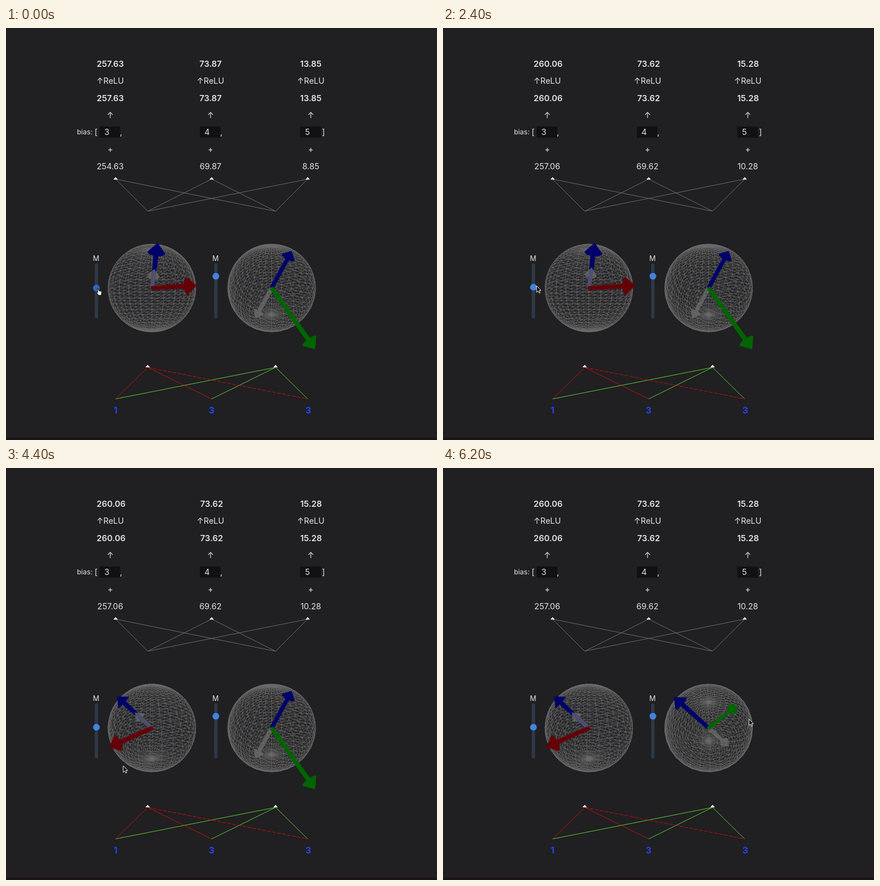
These frames come from a looping animation (765 px wide and 732 px high, 6300 ms). An HTML page with a canvas:

```html
<!DOCTYPE html>
<html lang="en">
<head>
<meta charset="utf-8">
<title>Layer weights</title>
<style>
  html, body { margin: 0; height: 100%; overflow: hidden; background: #201f21; }
  canvas { display: block; }
</style>
</head>
<body>
<canvas id="stage" width="765" height="732"></canvas>
<script>
const ctx = document.getElementById('stage').getContext('2d');
const LOOP = 6300, STEP = 100;
const RAD = Math.PI / 180;
const COLUMNS = [185, 363, 541];
const DISTANCE = 2.7, FOCAL = 195.6, SEGMENTS = 32;
const RED = '#640008', BLUE = '#00006a', GREEN = '#006400', GRAY = 'rgba(112,112,112,.7)';

// Timelines: [time, ...values]
const SCALE = [[0, 0], [1500, 1], [2300, 0.06]];
const LEFT_VIEW = [[2800, 0, -8], [3600, -88, -2], [4300, -103, 28]];
const RIGHT_VIEW = [[5000, 0, 37], [5100, 2.5, 37.5], [6200, 103, 65]];
const POINTER = [[2300, 166, 458], [2400, 166, 458], [2800, 284, 502], [3600, 220, 506],
  [4300, 208, 529], [4500, 208, 529], [5000, 461, 425], [5100, 463, 425], [6200, 543, 446]];

function at(keys, t) {
  const i = keys.findIndex(k => k[0] > t);
  if (i === 0) return keys[0].slice(1);
  if (i < 0) return keys[keys.length - 1].slice(1);
  const a = keys[i - 1], b = keys[i], f = (t - a[0]) / (b[0] - a[0]);
  return a.slice(1).map((v, j) => v + (b[j + 1] - v) * f);
}

// --- 3D ---
const add = (a, b, k) => a.map((v, i) => v + b[i] * k);
const cross = (a, b) => [a[1] * b[2] - a[2] * b[1], a[2] * b[0] - a[0] * b[2], a[0] * b[1] - a[1] * b[0]];
const unit = a => a.map(v => v / Math.hypot(...a));
const heading = (deg, h, v) => [h * Math.sin(deg * RAD), v, h * Math.cos(deg * RAD)];
const times = (a, k) => a.map(v => v * k);

function camera(cx, cy, [yaw, pitch]) {
  const sy = Math.sin(yaw * RAD), cyaw = Math.cos(yaw * RAD);
  const sp = Math.sin(pitch * RAD), cp = Math.cos(pitch * RAD);
  return ([x, y, z]) => {
    const front = z * cyaw - x * sy;
    const scale = FOCAL / (DISTANCE - y * sp - front * cp);
    return [cx + (x * cyaw + z * sy) * scale, cy - (y * cp - front * sp) * scale];
  };
}

function hull(points) {
  const sorted = [...points].sort((a, b) => a[0] - b[0] || a[1] - b[1]);
  const half = list => {
    const out = [];
    for (const p of list) {
      while (out.length > 1) {
        const [a, b] = out.slice(-2);
        if ((b[0] - a[0]) * (p[1] - a[1]) - (b[1] - a[1]) * (p[0] - a[0]) > 0) break;
        out.pop();
      }
      out.push(p);
    }
    return out.slice(0, -1);
  };
  return [...half(sorted), ...half(sorted.reverse())];
}

function trace(points) {
  points.forEach(([x, y], i) => i ? ctx.lineTo(x, y) : ctx.moveTo(x, y));
  ctx.closePath();
}

function arrow(project, tip, color, radius = 0.178) {
  const dir = unit(tip), u = unit(cross(dir, [0, 1, 0])), w = cross(dir, u);
  const base = add(tip, dir, -0.19);
  const ring = (center, r) => Array.from({ length: 10 }, (_, i) => {
    const a = i * Math.PI / 5;
    return project(add(add(center, u, r * Math.cos(a)), w, r * Math.sin(a)));
  });
  ctx.beginPath();
  trace(hull([...ring([0, 0, 0], 0.05), ...ring(base, 0.05)]));
  trace(hull([...ring(base, radius), project(tip)]));
  ctx.fillStyle = color;
  ctx.fill();
}

function globe(project) {
  const vertex = (i, j) => {
    const phi = i / SEGMENTS * 2 * Math.PI, theta = j / SEGMENTS * Math.PI;
    return project([-Math.cos(phi) * Math.sin(theta), Math.cos(theta), Math.sin(phi) * Math.sin(theta)]);
  };
  ctx.beginPath();
  for (let i = 0; i < SEGMENTS; i++) {
    for (let j = 0; j < SEGMENTS; j++) {
      const p = vertex(i, j);
      for (const q of [vertex(i + 1, j), vertex(i, j + 1), vertex(i + 1, j + 1)]) {
        ctx.moveTo(...p);
        ctx.lineTo(...q);
      }
    }
  }
  ctx.strokeStyle = '#6c6c6c';
  ctx.lineWidth = 0.6;
  ctx.stroke();
}

// --- flat parts ---
function text(str, x, y, { size = 14.5, weight = 400, color = '#e4e4e4', align = 'center' } = {}) {
  ctx.font = `${weight} ${size}px Inter, sans-serif`;
  ctx.fillStyle = color;
  ctx.textAlign = align;
  ctx.fillText(str, x, y + size * 0.364);
}

function line(x1, y1, x2, y2, color, dash = []) {
  ctx.beginPath();
  ctx.moveTo(x1, y1);
  ctx.lineTo(x2, y2);
  ctx.strokeStyle = color;
  ctx.lineWidth = 1;
  ctx.setLineDash(dash);
  ctx.stroke();
  ctx.setLineDash([]);
}

function rect(x, y, w, h, color, r = 0) {
  ctx.beginPath();
  ctx.roundRect(x, y, w, h, r);
  ctx.fillStyle = color;
  ctx.fill();
}

function marker(x, y) {
  ctx.beginPath();
  trace([[x, y - 3.5], [x + 4, y + 0.8], [x - 4, y + 0.8]]);
  ctx.fillStyle = '#fff';
  ctx.fill();
}

function slider(x, knobY, active, selected) {
  if (selected) rect(x - 6, 401, 11, 17, '#5d4b60');
  text('M', x - 0.5, 409, { size: 12.5 });
  rect(x - 3, 418, 6, 98, '#2d3947', 3);
  rect(x - 6, knobY - 6, 12, 12, active ? '#2f65c6' : '#4382de', 6);
}

function cursor(x, y, hand) {
  ctx.save();
  ctx.translate(x, y);
  ctx.beginPath();
  if (hand) {
    trace([[1, 0], [2.5, 0], [4, 4], [8, 4.5], [9, 6], [8.5, 10], [7.5, 12], [3.5, 12], [0, 7.5], [0.5, 6.5], [2, 7]]);
  } else {
    trace([[0, 0], [0, 11.5], [2.7, 9.2], [4.6, 13], [6.4, 12.2], [4.7, 8.5], [8, 8.2]]);
  }
  ctx.fillStyle = hand ? '#f4f4f4' : '#111';
  ctx.strokeStyle = hand ? '#111' : '#eee';
  ctx.lineWidth = 1;
  ctx.fill();
  ctx.stroke();
  ctx.restore();
}

function outputs(m, released) {
  const sums = [254.63 + 40.53 * m, 69.87 - 4.11 * m, 8.85 + 23.91 * m];
  text('bias:', 126, 185, { size: 12.3, align: 'left' });
  text('[', 160, 185);
  text(']', 563.5, 185);
  COLUMNS.forEach((x, i) => {
    const bias = i + 3, total = (sums[i] + bias).toFixed(2);
    const boldX = x + (released ? [1.5, 2, 0.5][i] : 0);
    text(total, boldX, 63.5, { size: 14.8, weight: 600 });
    text('↑ReLU', x, 94);
    text(total, boldX, 124.5, { size: 14.8, weight: 600 });
    text('↑', x, 154.5);
    rect(x - 19, 175, 37, 20, '#111013');
    text(bias, x - 6, 185);
    if (i < 2) text(',', x + 19, 185);
    text('+', x, 216);
    text(sums[i].toFixed(2), x, 245.5);
  });
}

function network() {
  const wide = [194.5, 365, 535.5], hidden = [251.5, 478.5];
  for (const x of wide) {
    for (const h of hidden) line(x, 268.5, h, 325.5, '#6b6b6b');
    marker(x, 268.5);
  }
  wide.forEach((x, i) => {
    line(hidden[1], 603, x, 659, '#5ccb35');
    line(hidden[0], 603, x, 659, '#c01212', i === 2 ? [7, 2] : []);
    text([1, 3, 3][i], x + (i === 2 ? 1 : 0), 679, { size: 16, weight: 700, color: '#2444ee' });
  });
  hidden.forEach(x => marker(x, 602));
}

function draw(t) {
  const m = at(SCALE, t)[0], released = t >= 2300;
  const knobY = 462 - 23 * m;
  rect(0, 0, 765, 732, '#201f21');
  rect(0, 728, 765, 4, '#1b131b');
  outputs(m, released);
  network();

  const left = camera(259, 462, at(LEFT_VIEW, t));
  const leftAxis = heading(8, 0.766, 0.745);
  globe(left);
  arrow(left, leftAxis, BLUE);
  arrow(left, times(leftAxis, 0.49 + 0.59 * m), GRAY, 0.14);
  arrow(left, times(heading(54, 1, -0.036), 1.05 + 0.49 * m), RED);

  const right = camera(471.5, 462, at(RIGHT_VIEW, t));
  const rightAxis = heading(140, 0.78, 0.71);
  globe(right);
  arrow(right, rightAxis, BLUE);
  arrow(right, times(rightAxis, -0.8), GRAY, 0.14);
  arrow(right, heading(38, 1.43, -0.7), GREEN);

  slider(160.5, knobY, !released, t >= 2900 && t < 3900);
  slider(372.5, 441, false, false);
  if (released) cursor(...at(POINTER, t), false);
  else cursor(161, knobY + 1, true);
}

function frame(now) {
  draw(Math.floor(now % LOOP / STEP) * STEP);
  requestAnimationFrame(frame);
}
requestAnimationFrame(frame);
</script>
</body>
</html>
```
